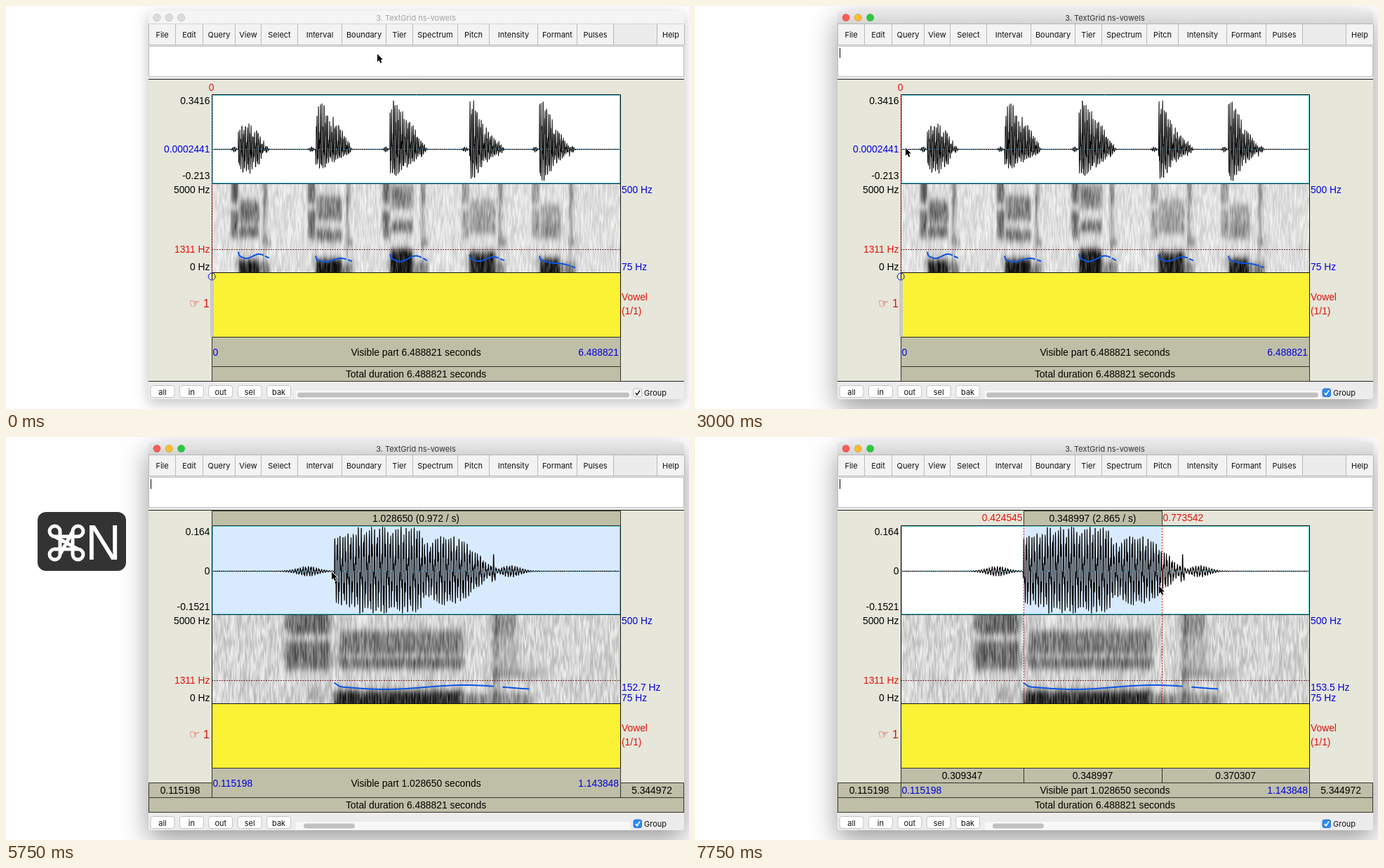
An HTML page with a canvas that plays this animation: 973x575 px, repeating every 8000 ms.

```html
<!DOCTYPE html>
<html lang="en">
<head>
<meta charset="utf-8">
<title>TextGrid editor</title>
<style>
  html, body { margin: 0; width: 100%; height: 100%; overflow: hidden; background: #fff; }
  canvas { display: block; }
</style>
</head>
<body>
<canvas id="stage" width="973" height="575"></canvas>
<script>
const ctx = document.getElementById('stage').getContext('2d');
const UI = '11px Inter, sans-serif';
const LABEL = '13.85px "Liberation Sans", Arial, sans-serif';
const RED = '#e0140a', BLUE = '#0000dc', BAR = '#bfbfa8', EDGE = '#33332a';
const LEFT = 293, WIDTH = 582, RIGHT = LEFT + WIDTH;
const LOOP = 8000, STEP = 250;
const TOTAL = 6.4888206, SEL_A = 0.115198, SEL_B = 1.1438484, VOICE_A = 0.4245448, VOICE_B = 0.7735416;

// ---------- helpers ----------
const smooth = p => p * p * (3 - 2 * p);
const bump = (d, w) => Math.exp(-d * d / (w * w));
const soft = (v, a, b, w) => 1 / (1 + Math.exp((a - v) / w)) / (1 + Math.exp((v - b) / w));

function hash(i, j) {
  const v = Math.sin(i * 127.1 + j * 311.7) * 43758.5453;
  return v - Math.floor(v);
}

function noise(x, y) {
  const i = Math.floor(x), j = Math.floor(y), u = smooth(x - i), v = smooth(y - j);
  const top = hash(i, j) * (1 - u) + hash(i + 1, j) * u;
  const low = hash(i, j + 1) * (1 - u) + hash(i + 1, j + 1) * u;
  return top * (1 - v) + low * v;
}

function layer(paint) {
  const canvas = document.createElement('canvas');
  canvas.width = 973;
  canvas.height = 575;
  paint(canvas.getContext('2d'));
  return canvas;
}

function text(str, x, y, color = '#000', align = 'left', font = LABEL) {
  ctx.font = font;
  ctx.fillStyle = color;
  ctx.textAlign = align;
  ctx.fillText(str, x, y);
}

function rect(x, y, w, h, fill, stroke) {
  if (fill) { ctx.fillStyle = fill; ctx.fillRect(x, y, w, h); }
  if (stroke) { ctx.strokeStyle = stroke; ctx.lineWidth = 1; ctx.strokeRect(x + 0.5, y + 0.5, w, h); }
}

function round(x, y, w, h, r, fill, stroke) {
  ctx.beginPath();
  ctx.roundRect(x, y, w, h, r);
  if (fill) { ctx.fillStyle = fill; ctx.fill(); }
  if (stroke) { ctx.strokeStyle = stroke; ctx.lineWidth = 1; ctx.stroke(); }
}

function circle(x, y, r, fill, stroke) {
  round(x - r, y - r, 2 * r, 2 * r, r, fill, stroke);
}

function polyline(points, color, width = 1, dash = [], c = ctx) {
  c.beginPath();
  points.forEach(p => c.lineTo(p[0], p[1]));
  c.strokeStyle = color;
  c.lineWidth = width;
  c.lineJoin = 'round';
  c.setLineDash(dash);
  c.stroke();
  c.setLineDash([]);
}

// ---------- sound model, in pixels of the full view ----------
// voiced: length of the voicing; top: upper edge of the voicing band; f3, f2: formant bands
const vowels = [
  { x: 331, len: 36, bend: 5, up: 37, down: 35, voiced: 29, release: 367, top: 362, f3: 293, f2: 322, tone: .56, pitch: 357, sag: 3, fall: 0 },
  { x: 441, len: 50, bend: 1.8, up: 68, down: 28, voiced: 37, release: 485, top: 361, f3: 288, f2: 327, tone: .52, pitch: 362.5, sag: 2.5, fall: 0 },
  { x: 547, len: 50, bend: 1.3, up: 82, down: 46, voiced: 32, release: 592, top: 347, f3: 272, f2: 314, tone: .5, pitch: 360.5, sag: 4, fall: 0 },
  { x: 660, len: 47, bend: .65, up: 95, down: 58, voiced: 37, release: 702, top: 351, f3: 292, f2: 316, tone: .3, pitch: 361, sag: 3, fall: 0 },
  { x: 760, len: 45, bend: .75, up: 88, down: 58, voiced: 29, release: 803, top: 360, f3: 300, f2: 323, tone: .34, pitch: 362, sag: 1, fall: 9 }
];

function envelope(x) {
  let up = 0.2, down = 0.2;
  for (const v of vowels) {
    const d = x - v.x, u = d / v.len, r = x - v.release;
    const body = u > 0 && u < 1 ? Math.min(1, 0.75 + d / 25) * (1 - u ** v.bend) * (1 - 0.35 * bump(d - 21.5, 1.8)) : 0;
    const breath = 4 * bump(d + 6, 3.2) + 13 * bump(r, 0.4) + 5 * bump(r - 4, 2.8);
    up += v.up * body + breath;
    down += v.down * body + breath;
  }
  return [up, down];
}

const spectralBoxes = vowels.flatMap(v => {
  const onset = v.x - 11, end = v.x + v.voiced, r = v.release, dark = v.tone;
  return [
    [onset, v.x - 1, 245, 281, dark],
    [onset, v.x - 1, 291, 331, dark],
    [v.x - 6, v.x - 2, 358, 376, .18],
    [v.x + 1, end, v.f3 - 17, v.f3 + 17, dark * .85],
    [v.x + 1, end, v.f2 - 8, v.f2 + 8, dark],
    [v.x, end, v.top, 400, .88],
    [end, r + 9, 365, 400, .38],
    [r, r + .6, 245, 390, .55],
    [r, r + 5, 245, 283, .35],
    [r, r + 5, 283, 340, .15],
    [r, r + 10, 332, 343, .25]
  ];
});

// A view shows the same sound with its own origin, magnification and pulse spacing.
function makeView({ origin, scale, gain, axis, pulse, base, cell, edge, ripple }) {
  const toModel = x => origin + (x - LEFT) / scale;
  const toScreen = x => LEFT + (x - origin) * scale;

  const wave = layer(c => {
    const points = [];
    for (let x = LEFT; x <= RIGHT; x += 0.3) {
      const [up, down] = envelope(toModel(x));
      const cycle = x / pulse, phase = cycle * 2 * Math.PI;
      const f = 0.85 * Math.sin(phase) + 0.5 * Math.sin(phase * 2.6 + 1);
      const size = Math.max(-1, Math.min(1, f)) * (0.82 + 0.18 * hash(Math.floor(cycle), 3));
      points.push([x, axis + .5 - size * gain * (size > 0 ? up : down)]);
    }
    c.rect(LEFT, 126, WIDTH, 127);
    c.clip();
    polyline(points, '#000', 1.05, [], c);
  });

  const spectrogram = layer(c => {
    const image = c.createImageData(WIDTH, 127);
    for (let y = 0; y < 127; y++) for (let x = 0; x < WIDTH; x++) {
      const mx = toModel(x + LEFT), py = y + 254;
      let light = 1;
      for (const [x0, x1, y0, y1, dark] of spectralBoxes) {
        if (mx > x0 - 9 && mx < x1 + 9) light *= 1 - dark * soft(mx, x0, x1, edge) * soft(py, y0, y1, 3);
      }
      const column = x / cell;
      const n = noise(column, py / 11 + hash(Math.floor(column), 7));
      const stripe = 1 - ripple * (0.5 + 0.5 * Math.cos(x * 2 * Math.PI / pulse));
      const shade = (1 - light) * (0.78 + 0.4 * n) * stripe + base * (0.3 + 1.3 * n) * light;
      const k = 4 * (y * WIDTH + x);
      image.data.fill(255 * (1 - Math.min(0.95, shade)), k, k + 3);
      image.data[k + 3] = 255;
    }
    c.putImageData(image, LEFT, 254);
  });

  const pitch = vowels.flatMap(v => [[0, v.release - v.x], [v.release - v.x + 2, v.release - v.x + 8]].map(([a, b]) => {
    const points = [];
    for (let d = a; d <= b; d += 0.5) {
      const u = d / (v.release - v.x);
      points.push([toScreen(v.x + d), v.pitch + v.sag * Math.sin(2 * Math.PI * (u - .07)) + v.fall * u - 5 * bump(d, .8)]);
    }
    return points;
  }));

  return { axis, wave, spectrogram, pitch };
}

const fullView = makeView({ origin: LEFT, scale: 1, gain: 1, axis: 204, pulse: 2.6, base: .13, cell: 1.5, edge: 1, ripple: 0 });
const zoomView = makeView({
  origin: LEFT + SEL_A / TOTAL * WIDTH, scale: TOTAL / (SEL_B - SEL_A),
  gain: 1.754, axis: 191, pulse: 3.77, base: .18, cell: 1.7, edge: .35, ripple: .15
});

// ---------- motion: [time, pointer x, pointer y, dragged selection end] ----------
const path = [
  [0, 529, 68, 0], [1250, 303, 205, 0], [2250, 303, 205, 0], [3000, 300, 202, SEL_A],
  [3750, 391, 205, SEL_B], [5000, 391, 205, SEL_B], [5750, 464, 192, VOICE_A],
  [6250, 464, 192, VOICE_A], [7250, 661, 212, VOICE_B]
];

function moveAlong(keys, t) {
  const i = keys.findIndex(k => k[0] > t);
  if (i < 0) return keys[keys.length - 1];
  const a = keys[i - 1], b = keys[i], p = smooth((t - a[0]) / (b[0] - a[0]));
  return a.map((v, k) => v + (b[k] - v) * p);
}

function stateAt(t) {
  const [, x, y, drag] = moveAlong(path, t);
  const s = { x, y, zoom: t >= 4750, active: t >= 1750, start: 0, end: 0, pitch: null, value: '0' };
  s.caret = s.active && ![2250, 4250, 5250].some(off => t >= off && t < off + 500);
  if (t < 3250) s.value = '0.0002441';
  else if (t < 4750) Object.assign(s, { start: SEL_A, end: drag, pitch: drag > 0.45 ? 153.1 : null });
  else if (t < 6250) Object.assign(s, { start: SEL_A, end: SEL_B, pitch: 152.7 });
  else if (t < 6500) Object.assign(s, { start: VOICE_A, end: VOICE_A, pitch: 176.1, value: '0.001409' });
  else Object.assign(s, { start: VOICE_A, end: drag, pitch: 153.5 });
  s.key = t < 4750 || t >= 6500 ? null : t < 6250 ? ['#333', '#fff'] : ['#999', '#c6c6c6'];
  return s;
}

// ---------- window ----------
const menuEdges = [203, 241, 280, 326, 363, 415, 478, 541, 579, 643, 688, 757, 813, 865];
const menuNames = ['File', 'Edit', 'Query', 'View', 'Select', 'Interval', 'Boundary', 'Tier', 'Spectrum', 'Pitch', 'Intensity', 'Formant', 'Pulses'];

function menuButton(name, a, b) {
  rect(a, 26, b - a, 29, '#f3f3f3');
  rect(a, 26, 1, 29, '#b9b9b9');
  rect(b, 26, 1, 29, '#b9b9b9');
  text(name, (a + b) / 2 + 0.5, 45, '#111', 'center', UI);
}

function drawChrome(s) {
  ctx.save();
  ctx.shadowColor = s.active ? 'rgba(0,0,0,.4)' : 'rgba(0,0,0,.24)';
  ctx.shadowBlur = s.active ? 38 : 20;
  ctx.shadowOffsetY = s.active ? 13 : 6;
  round(203, 7, 763, 554, [5, 5, 4, 4], '#ececec');
  ctx.restore();

  const bar = ctx.createLinearGradient(0, 7, 0, 26);
  bar.addColorStop(0, s.active ? '#e9e9e9' : '#f6f6f6');
  bar.addColorStop(1, s.active ? '#d4d4d4' : '#f4f4f4');
  round(203, 7, 763, 19, [5, 5, 0, 0], bar);
  rect(203, 25, 763, 1, s.active ? '#b4b4b4' : '#d4d4d4');
  ['#fc5b57', '#fdbc2f', '#2bc840'].forEach((color, i) =>
    circle(215 + 17.3 * i, 16.5, 5.2, s.active ? color : '#dcdcdc', s.active ? 'rgba(0,0,0,.12)' : '#c9c9c9'));
  text('3. TextGrid ns-vowels', 584, 20.5, s.active ? '#333' : '#a4a4a4', 'center', UI);

  menuNames.forEach((name, i) => menuButton(name, menuEdges[i], menuEdges[i + 1]));
  menuButton('Help', 927, 966);
  rect(203, 55, 763, 1, '#b9b9b9');
  rect(203, 57, 762, 43, '#fff', '#bdbdbd');
  if (s.caret) rect(206, 60, 1, 14, '#000');

  rect(203, 104, 763, 431, '#e6e6da');
  rect(203, 104, 763, 1, '#222');
  rect(203, 535, 763, 1, '#222');

  ['all', 'in', 'out', 'sel', 'bak'].forEach((name, i) => {
    const x = 206 + 41.4 * i;
    round(x, 541.5, 34, 17, 3.5, '#fff', '#c2c2c2');
    text(name, x + 17, 554.5, '#111', 'center', UI);
  });
  rect(413, 549, 477, 12, '#f7f7f7');
  round(s.zoom ? 424 : 415, 551.5, s.zoom ? 73 : 473, 7, 3.5, '#c1c1c1');
  round(894, 546, 11.5, 11.5, 2.5, s.active ? '#2f87f7' : '#fff', s.active ? '#2a78e0' : '#b5b5b5');
  polyline([[896.8, 552], [899, 554.8], [903, 548.5]], s.active ? '#fff' : '#222', 1.6);
  text('Group', 909, 555.5, '#111', 'left', UI);
}

// ---------- editor ----------
const seconds = v => v === 0 ? '0' : v.toFixed(6);

// A bar with the first label that fits.
function box(x0, x1, y0, y1, ...labels) {
  rect(x0, y0, x1 - x0, y1 - y0, BAR, EDGE);
  ctx.font = LABEL;
  const label = labels.find(l => ctx.measureText(l).width < x1 - x0 - 4);
  if (label) text(label, (x0 + x1) / 2, (y0 + y1) / 2 + 5.5, '#000', 'center');
}

function drawEditor(s) {
  const from = s.zoom ? SEL_A : 0, to = s.zoom ? SEL_B : TOTAL;
  const toX = v => Math.round(LEFT + (v - from) / (to - from) * WIDTH);
  const a = toX(s.start), b = toX(s.end), span = s.end - s.start;
  const selected = span > 0, whole = a === LEFT && b === RIGHT;
  const view = s.zoom ? zoomView : fullView;

  rect(LEFT, 126, WIDTH, 127, '#fff');
  if (selected) rect(a, 126, b - a, 127, '#d8eafe');
  ctx.drawImage(view.wave, 0, 0);
  polyline([[LEFT, view.axis + .5], [RIGHT, view.axis + .5]], '#3b8db0', 1, [1, 2]);
  ctx.drawImage(view.spectrogram, 0, 0);
  polyline([[LEFT, 347.5], [RIGHT, 347.5]], '#6a2020', 1, [2, 1.5]);
  view.pitch.forEach(p => polyline(p, '#0a55e6', 2));

  // Hides pitch that lies outside the plot in the zoomed view.
  rect(203, 340, LEFT - 203, 41, '#e6e6da');
  rect(RIGHT, 340, 966 - RIGHT, 41, '#e6e6da');

  rect(LEFT, 381, WIDTH, 91, '#fbf236');
  rect(LEFT, 126, WIDTH, 346, null, '#111');
  rect(LEFT, 380, WIDTH, 1, '#111');
  rect(LEFT + 1, 127, WIDTH - 2, 125, null, '#58cfe4');
  rect(LEFT, 253, WIDTH, 1, '#12303a');

  // Selection or cursor
  const mark = x => polyline([[x + .5, 126], [x + .5, 380]], '#e01818', 1, [2, 2]);
  if (selected) {
    box(a, b, 105, 126, `${seconds(span)} (${(1 / span).toFixed(3)} / s)`, seconds(span));
    if (!whole) {
      mark(a);
      mark(b);
      text(seconds(s.start), a - 1.5, 120, RED, 'right');
      text(seconds(s.end), b + 1.5, 120, RED);
    }
  } else {
    mark(a);
    rect(a - 2, 390, 5, 82, '#c9c9c9');
    circle(a + .2, 386, 5, null, '#1414d8');
    text(seconds(s.start), a - .5, 121, RED, 'center');
  }

  // Axis labels
  const left = (str, y, color) => text(str, 290.5, y + 5, color, 'right');
  const right = (str, y, color = BLUE) => text(str, 877, y + 5, color);
  left(s.zoom ? '0.164' : '0.3416', 135);
  left(s.value, view.axis - .5, s.value === '0' ? '#000' : BLUE);
  left(s.zoom ? '-0.1521' : '-0.213', 242);
  left('5000 Hz', 262);
  left('1311 Hz', 347, RED);
  left('0 Hz', 371.5);
  text('☞', 261, 429.5, RED, 'left', 'bold 17px "DejaVu Sans", sans-serif');
  text('1', 290, 430, RED, 'right', '16px "Liberation Sans", Arial, sans-serif');
  right('500 Hz', 262);
  if (s.pitch) right(s.pitch + ' Hz', 380.5 - (s.pitch - 75) / 425 * 127);
  right('75 Hz', 371.5);
  right('Vowel', 415, RED);
  right('(1/1)', 435, RED);

  // Duration bars
  const cuts = [...new Set([from, s.start, s.end, to])];
  const split = cuts.length > 2, top = split ? 493 : 472;
  if (split) cuts.slice(1).forEach((v, i) => box(toX(cuts[i]), toX(v), 472, 493, seconds(v - cuts[i])));
  box(LEFT, RIGHT, top, 514, `Visible part ${seconds(to - from)} seconds`);
  const base = (top + 514) / 2 + 5.5;
  text(seconds(from), 294.5, base, BLUE);
  text(seconds(to), 873, base, BLUE, 'right');
  if (s.zoom) {
    box(203, LEFT, 493, 514, seconds(from));
    box(RIGHT, 965, 493, 514, seconds(TOTAL - to));
  }
  box(s.zoom ? 203 : LEFT, s.zoom ? 965 : RIGHT, 514, 535, `Total duration ${seconds(TOTAL)} seconds`);
}

function drawKey([back, front]) {
  round(45, 107, 126, 84, 12, back);
  ctx.strokeStyle = front;
  ctx.lineWidth = 5;
  ctx.beginPath();
  const half = 9, r = 7.5, far = half + r, turn = Math.PI / 2;
  for (let i = 0; i < 4; i++) {
    // One corner loop per quarter turn around the centre
    const angle = i * turn, c = Math.cos(angle), n = Math.sin(angle);
    ctx.arc(86 - far * c + far * n, 151 - far * n - far * c, r, angle + turn, angle, false);
    ctx.lineTo(86 - half * c - far * n, 151 - half * n + far * c);
  }
  ctx.stroke();
  text('N', 138.5, 175, front, 'center', '70px "Liberation Sans", Arial, sans-serif');
}

function drawPointer(x, y) {
  ctx.save();
  ctx.translate(x, y + .5);
  ctx.scale(.92, .92);
  ctx.beginPath();
  [[0, 0], [0, 12], [2.7, 9.6], [4.7, 14], [6.8, 13.1], [4.9, 8.8], [8.6, 8.6]].forEach(p => ctx.lineTo(...p));
  ctx.closePath();
  ctx.strokeStyle = '#fff';
  ctx.lineWidth = 1.8;
  ctx.stroke();
  ctx.fillStyle = '#000';
  ctx.fill();
  ctx.restore();
}

function frame() {
  const t = Math.floor(performance.now() % LOOP / STEP) * STEP;
  const s = stateAt(t);
  rect(0, 0, 973, 575, '#fff');
  drawChrome(s);
  drawEditor(s);
  if (s.key) drawKey(s.key);
  drawPointer(s.x, s.y);
  requestAnimationFrame(frame);
}
frame();
</script>
</body>
</html>
```
